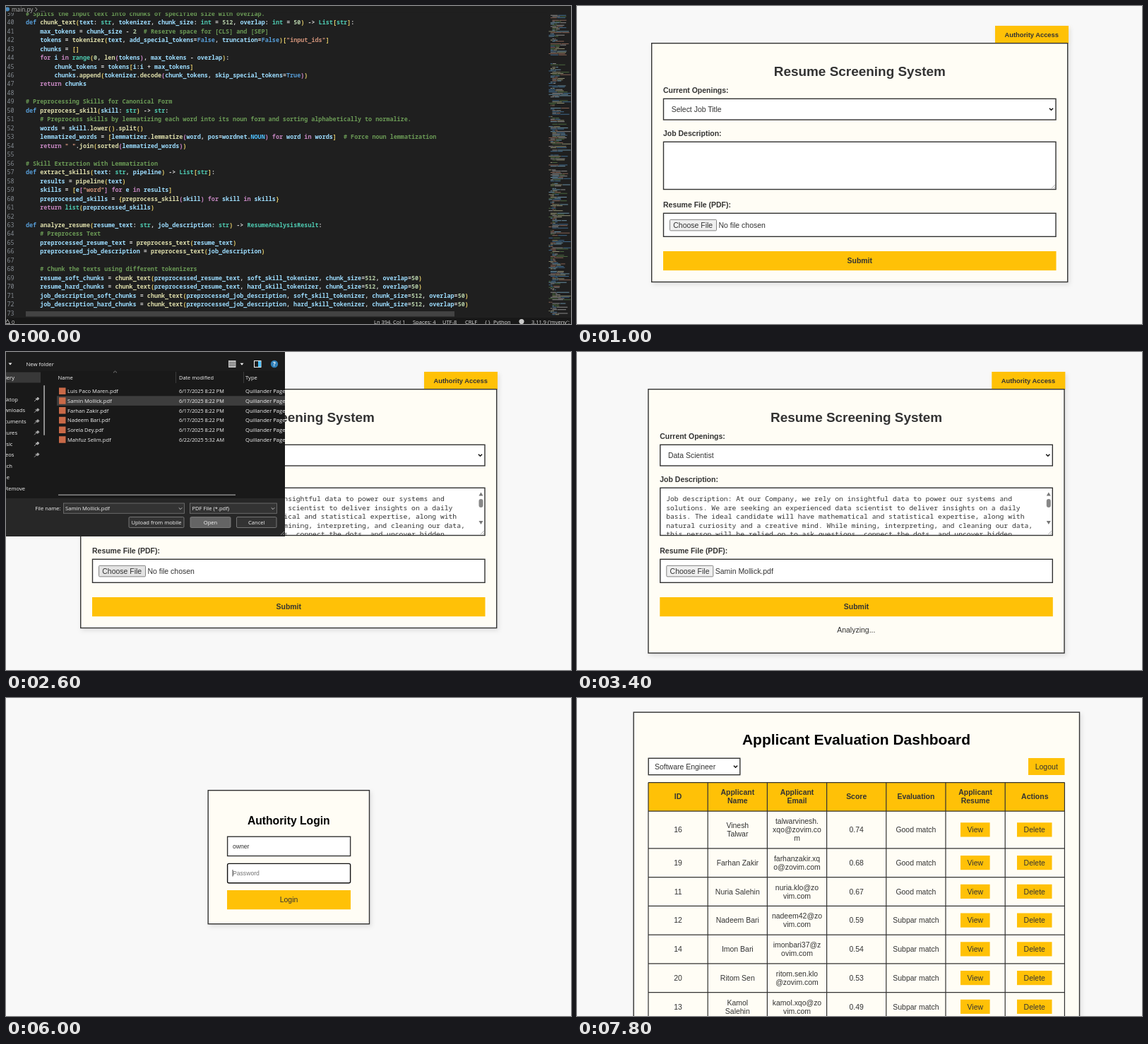
These frames come from a looping animation (800 px wide and 450 px high, 8000 ms). An HTML page:

```html
<!DOCTYPE html>
<html lang="en">
<head>
<meta charset="utf-8">
<title>Resume Screening System</title>
<style>
  html, body { margin: 0; width: 100%; height: 100%; overflow: hidden; background: #f8f8f8; }
  svg { display: block; width: 100vw; height: 100vh; }
  text { white-space: pre; }
  .sans { font-family: "Liberation Sans", Arial, sans-serif; }
  .ui { font-family: "Open Sans", "Noto Sans", sans-serif; }
  .mono { font-family: "Noto Sans Mono", "DejaVu Sans Mono", monospace; }
  .card { filter: drop-shadow(2px 3px 3px rgba(0, 0, 0, .1)); }
</style>
</head>
<body>
<svg id="stage" viewBox="0 0 800 450"></svg>
<script>
const stage = document.getElementById('stage');
const LOOP = 8000, STEP = 200;
const INK = '#333', GOLD = '#ffc107', CREAM = '#fffdf5';

const esc = s => String(s).replace(/&/g, '&amp;').replace(/</g, '&lt;').replace(/>/g, '&gt;');
const text = (x, y, s, size, fill = INK, extra = '') =>
  `<text x="${x}" y="${y}" font-size="${size}" fill="${fill}" ${extra}>${esc(s)}</text>`;
const MID = 'text-anchor="middle" ', END = 'text-anchor="end" ', BOLD = 'font-weight="700" ';
const box = (x, y, w, h, fill, stroke = 'none', sw = 1, extra = '') =>
  `<rect x="${x}" y="${y}" width="${w}" height="${h}" fill="${fill}" stroke="${stroke}" stroke-width="${sw}" ${extra}/>`;
const path = (d, stroke, sw = 1, fill = 'none') =>
  `<path d="${d}" fill="${fill}" stroke="${stroke}" stroke-width="${sw}"/>`;
const dot = (x, y, r, fill) => `<circle cx="${x}" cy="${y}" r="${r}" fill="${fill}"/>`;
const chevron = (x, y, r, color, sw = 1) => path(`M${x - r} ${y - r / 2}l${r} ${r} ${r} ${-r}`, color, sw);
const group = (cls, body, dx = 0, dy = 0) => `<g class="${cls}" transform="translate(${dx} ${dy})">${body}</g>`;
const button = (x, y, w, h, label, size = 10.5, extra = '') =>
  box(x, y, w, h, GOLD) + text(x + w / 2, y + h / 2 + size * .36, label, size, INK, MID + extra);

/* ---------- code editor ---------- */

const CODE = `# Splits the input text into chunks of specified size with overlap.
def chunk_text(text: str, tokenizer, chunk_size: int = 512, overlap: int = 50) -> List[str]:
    max_tokens = chunk_size - 2  # Reserve space for [CLS] and [SEP]
    tokens = tokenizer(text, add_special_tokens=False, truncation=False)["input_ids"]
    chunks = []
    for i in range(0, len(tokens), max_tokens - overlap):
        chunk_tokens = tokens[i:i + max_tokens]
        chunks.append(tokenizer.decode(chunk_tokens, skip_special_tokens=True))
    return chunks

# Preprocessing Skills for Canonical Form
def preprocess_skill(skill: str) -> str:
    # Preprocess skills by lemmatizing each word into its noun form and sorting alphabetically to normalize.
    words = skill.lower().split()
    lemmatized_words = [lemmatizer.lemmatize(word, pos=wordnet.NOUN) for word in words]  # Force noun lemmatization
    return " ".join(sorted(lemmatized_words))

# Skill Extraction with Lemmatization
def extract_skills(text: str, pipeline) -> List[str]:
    results = pipeline(text)
    skills = [e["word"] for e in results]
    preprocessed_skills = {preprocess_skill(skill) for skill in skills}
    return list(preprocessed_skills)

def analyze_resume(resume_text: str, job_description: str) -> ResumeAnalysisResult:
    # Preprocess Text
    preprocessed_resume_text = preprocess_text(resume_text)
    preprocessed_job_description = preprocess_text(job_description)

    # Chunk the texts using different tokenizers
    resume_soft_chunks = chunk_text(preprocessed_resume_text, soft_skill_tokenizer, chunk_size=512, overlap=50)
    resume_hard_chunks = chunk_text(preprocessed_resume_text, hard_skill_tokenizer, chunk_size=512, overlap=50)
    job_description_soft_chunks = chunk_text(preprocessed_job_description, soft_skill_tokenizer, chunk_size=512, overlap=50)
    job_description_hard_chunks = chunk_text(preprocessed_job_description, hard_skill_tokenizer, chunk_size=512, overlap=50)
`.split('\n');

const BRACKETS = ['#e8cf6a', '#d58ad0', '#5aa9e6'];

function paint(line) {
  let depth = 0;
  return line.replace(/#.*|"[^"]*"|\w+(?=\()|\w+|[()[\]{}]|[^\w\s]/g, (s, at) => {
    let c = '#d4d4d4';
    if (s[0] === '#') c = '#6a9955';
    else if (s[0] === '"') c = '#ce9178';
    else if (/^(for|in|return)$/.test(s)) c = '#c586c0';
    else if (/^(def|True|False)$/.test(s)) c = '#569cd6';
    else if (/^(str|int|list|List|range|ResumeAnalysisResult)$/.test(s)) c = '#4ec9b0';
    else if (/^\d/.test(s)) c = '#b5cea8';
    else if (/^\w/.test(s)) c = s === 'NOUN' ? '#4fc1ff' : line[at + s.length] === '(' ? '#dcdcaa' : '#9cdcfe';
    else if (/[([{]/.test(s)) c = BRACKETS[depth++ % 3];
    else if (/[)\]}]/.test(s)) c = BRACKETS[--depth % 3];
    return `<tspan fill="${c}">${esc(s)}</tspan>`;
  });
}

function minimap() {
  let seed = 7, out = '';
  const rnd = () => (seed = seed * 16807 % 2147483647) / 2147483647;
  const colors = ['#9cdcfe', '#d4d4d4', '#6a9955', '#dcdcaa', '#569cd6', '#ce9178'];
  const color = () => colors[Math.floor(rnd() * colors.length)];
  for (let y = 11; y < 437; y += 1.75) {
    if (rnd() < .14) continue;
    const x = 768.5 + (rnd() < .25 ? 0 : rnd() < .6 ? 2.5 : 5);
    const w = Math.min(4 + rnd() * 24, 799 - x), cut = w * (.25 + rnd() * .4);
    out += box(x, y, cut, .9, color()) + box(x + cut + .6, y, w - cut, .9, color());
  }
  return `<g opacity=".65">${out}</g>`;
}

function editor(scroll) {
  const rows = CODE.map((_, i) => {
    const y = 13.7 + i * 12.47;
    return text(11.5, y, 39 + i + scroll, 8.4, '#858b92', END) +
      `<text x="28" y="${y}" font-size="8.44" font-weight="600">${paint(CODE[(i + scroll) % CODE.length])}</text>`;
  }).join('');
  const status = [[521, 'Ln 394, Col 1'], [576, 'Spaces: 4'], [618, 'UTF-8'], [650, 'CRLF'], [678, '{ }'], [690, 'Python'], [744, "3.11.9 ('myenv': venv)"]];
  return box(0, 0, 800, 450, '#1f1f1f') + group('mono', rows) + minimap() +
    box(28, 432, 607, 7.5, '#434343') + box(0, 0, 766, 9.5, '#1f1f1f') +
    box(0, 441, 800, 9, '#181818') +
    group('ui', dot(2, 4.5, 3, '#4b8bbe') + text(8, 7.8, 'main.py', 8.2, '#b5b5b5') +
      path('M41.5 2l2.5 2.8-2.5 2.8', '#b5b5b5', .9) + text(49, 7.5, '...', 8, '#b5b5b5') +
      path('M-1 449.5l3.2-6 3.2 6z', '#ccc', .8) + text(8, 449.7, '0', 7.4, '#ccc') +
      status.map(([x, s]) => text(x, 449.7, s, 7.5, '#ddd')).join('') + dot(730, 446.5, 3.6, '#ccc'));
}

/* ---------- screening form ---------- */

const JOB = [
  'Job description: At our Company, we rely on insightful data to power our systems and',
  'solutions. We are seeking an experienced data scientist to deliver insights on a daily',
  'basis. The ideal candidate will have mathematical and statistical expertise, along with',
  'natural curiosity and a creative mind. While mining, interpreting, and cleaning our data,',
  'this person will be relied on to ask questions, connect the dots, and uncover hidden'];
const ROLES = ['Select Job Title', 'Data Scientist', 'Software Engineer'];
const PICKED = 'Samin Mollick.pdf';

const popup = (x, y, w, active) => box(x, y, w, 42, '#fff', '#767676', .8) +
  ROLES.map((r, i) => (i === active ? box(x + .5, y + 1 + i * 13.4, w - 1, 13.4, '#1967d2') : '') +
    text(x + 5, y + 11.3 + i * 13.4, r, 10.5, i === active ? '#fff' : INK)).join('');

const field = (y, h) => box(122.5, y, 555.5, h, '#fff', INK, 1.4);

function jobText() {
  return '<clipPath id="area"><rect x="123" y="193" width="545" height="66"/></clipPath>' +
    `<g class="mono" clip-path="url(#area)">${JOB.map((s, i) => text(130.9, 211 + i * 12.5, s, 9.73)).join('')}</g>` +
    path('M669.5 203.5h6l-3-5z', 'none', 0, '#777') + path('M669.5 239h6l-3 5z', 'none', 0, '#777') +
    box(669.5, 208, 6, 12, '#888', 'none', 0, 'rx="3"');
}

function form({ role, filled, browsing, file, analyzing, results, open, dx = 0, scroll = 0 }) {
  const bottom = results ? 503 : analyzing ? 426 : 390.5;
  let s = `<g class="card">${box(592, 28, 104, 25, GOLD)}${box(105.7, 52.7, 589, bottom - 52.7, CREAM, INK, 1.4)}</g>`;
  s += text(643.7, 43.6, 'Authority Access', 9.36, INK, MID + BOLD) +
    text(400.3, 98.6, 'Resume Screening System', 18.95, INK, MID + BOLD);
  [['Current Openings:', 122.8], ['Job Description:', 184], ['Resume File (PDF):', 285]]
    .forEach(([label, y]) => s += text(122, y, label, 10.47, INK, BOLD));
  s += field(131.3, 29.7) + text(133.7, 149.8, ROLES[role], 10.47) + chevron(671.5, 146, 2.6, '#111', 1.5) +
    field(192.3, 67.2) + (filled ? jobText() : '') + path('M672 258l5-5M675 258l2-2', '#999', .8) +
    field(293.3, 33) + box(131.5, 302.3, 66, 15.6, browsing ? '#e3e3e3' : '#efefef', '#767676', .9, 'rx="1.2"') +
    text(136.3, 313.7, 'Choose File', 10.47) + text(200.5, 313.7, file ? PICKED : 'No file chosen', 10.47) +
    button(122, 347, 556.5, 27.2, 'Submit', 10.47, BOLD);
  if (analyzing) s += text(400, 396.6, 'Analyzing...', 10.47, INK, MID);
  if (results) s += box(122.5, 388.2, 555.5, 98, '#f1f3f5', INK, 1.4) +
    text(136.5, 429.6, 'Analysis Results', 15.7, INK, BOLD) +
    text(137, 450.5, 'Score:', 10.47, '#444', BOLD) + text(172, 450.5, '0.61', 10.47, '#555') +
    text(137, 468, 'Evaluation:', 10.47, '#444', BOLD) + text(197, 468, 'Good match', 10.47, '#555');
  if (open) s += popup(122.5, 161.5, 555.5, 1);
  return box(0, 0, 800, 450, '#f8f8f8') + group('sans', s, dx, -scroll);
}

/* ---------- file dialog ---------- */

const FILES = ['Luis Paco Maren', 'Samin Mollick', 'Farhan Zakir', 'Nadeem Bari', 'Sorela Dey', 'Mahfuz Selim'];

function dialog(chosen) {
  const W = '#f4f4f4', say = (x, y, s, extra = '', size = 7.6) => text(x, y, s, size, W, extra);
  let s = box(0, 0, 395, 261, '#191919') + box(0, 0, 395, 27, '#1c1c1c') +
    path('M3.5 15.5h5l-2.5 3z', 'none', 0, W) + say(28.5, 19.7, 'New folder', '', 7.7) +
    box(315.5, 12.5, 9.5, 9, '#aaa', '#ddd', .8) + path('M316 15.5h9M316 18.5h9', '#555', .7) +
    path('M331.5 15.7h5l-2.5 3z', 'none', 0, W) +
    box(351.5, 12.5, 9.5, 9, 'none', W, 1) + box(357, 13, 4, 8, '#4cc2ff') +
    dot(380, 17, 5.2, '#2f7fb8') + text(380, 19.8, '?', 8, '#fff', MID + BOLD) +
    box(0, 28.5, 49, 15, '#383838') + say(12, 38.6, 'Gallery', END);
  [['Desktop', 17], ['Downloads', 27], ['Documents', 28.5], ['Pictures', 16], ['Music', 9.5], ['Videos', 11.5], ['tch', 9], ['e', 5], ['Remove', 27]]
    .forEach(([name, x], i) => {
      const y = 67 + i * 15.75;
      s += say(x, y + 2.7, name, END);
      if (i < 6) s += path(`M40 ${y + 3}l3-3M41.5 ${y - 1.5}l3 3M43 ${y - 1}l2-2 2 2-2 2z`, '#aaa', .9, '#aaa');
    });
  s += box(53.2, 47, 1.8, 71, '#999', 'none', 0, 'rx="1"') +
    say(73.5, 38.7, 'Name') + say(245, 38.7, 'Date modified', '', 7.4) + say(339, 38.7, 'Type') +
    path('M152 29.3l2.5-2.2 2.5 2.2', '#999', .8) + path('M240.5 28v16M336.5 28v16', '#444', .8);
  FILES.forEach((name, i) => {
    const y = 55.3 + i * 13.75;
    if (chosen && i === 1) s += box(72, y - 6.8, 323, 13.6, '#3d3d3d');
    s += box(75, y - 4.8, 9.5, 9.5, '#c96a48') + say(87, y + 2.7, name + '.pdf') +
      say(245, y + 2.7, i < 5 ? '6/17/2025 8:22 PM' : '6/22/2025 5:32 AM', '', 7.3) + say(339, y + 2.7, 'Quillander Page D');
  });
  s += box(74, 201.6, 251, 1.3, '#999') + box(0, 207, 395, 54, '#272727') +
    say(77.5, 223.5, 'File name:', END) + box(81.5, 214, 171, 14.3, '#333', '#777', .8) +
    say(84, 223.8, chosen ? PICKED : '') + chevron(247, 221.5, 2.3, '#ccc', .9) +
    box(260.5, 214, 123, 14.3, '#333', '#777', .8) + say(263.5, 223.8, 'PDF File (*.pdf)') + chevron(378, 221.5, 2.3, '#ccc', .9);
  [[174, 78, 'Upload from mobile', '#333'], [261, 57, 'Open', '#646464'], [326.5, 56.5, 'Cancel', '#333']]
    .forEach(([x, w, label, fill]) => s += box(x, 233.5, w, 15, fill, '#888', .8, 'rx="1.5"') + say(x + w / 2, 243.7, label, MID));
  s += path('M389 259l5-5M392 259l2-2', '#999', .9);
  return '<clipPath id="win"><rect width="395" height="261"/></clipPath>' + `<g class="ui" clip-path="url(#win)">${s}</g>`;
}

/* ---------- login ---------- */

function login(user, onPassword, typed) {
  const input = (y, on) => box(313.6, y, 174, 27.3, '#fff', on ? '#111' : INK, 1.4, on ? 'rx="2"' : '');
  const entry = typed ? text(321, 251.5, '•'.repeat(typed), 10, INK) : text(321, 250.9, 'Password', 8.65, '#757575');
  return box(0, 0, 800, 450, '#f8f8f8') + group('sans',
    `<g class="card">${box(286.2, 130.7, 228.3, 189, CREAM, INK, 1.4)}</g>` +
    text(400.3, 179, 'Authority Login', 15.7, '#000', MID + BOLD) +
    input(196.2, !onPassword) + text(321, 212.9, user || 'Username', 8.65, user ? INK : '#757575') +
    input(234.4, onPassword) + entry + (onPassword && !typed ? path('M321 243v9.5', '#222', .8) : '') +
    button(313, 272, 175, 27.2, 'Login'));
}

/* ---------- dashboard ---------- */

const HEAD = ['ID', 'Applicant|Name', 'Applicant|Email', 'Score', 'Evaluation', 'Applicant|Resume', 'Actions'];
const SOFTWARE = [
  [16, 'Vinesh|Talwar', 'talwarvinesh.|xqo@zovim.co|m', .74],
  [19, 'Farhan Zakir', 'farhanzakir.xq|o@zovim.com', .68],
  [11, 'Nuria Salehin', 'nuria.klo@zo|vim.com', .67],
  [12, 'Nadeem Bari', 'nadeem42@zo|vim.com', .59],
  [14, 'Imon Bari', 'imonbari37@z|ovim.com', .54],
  [20, 'Ritom Sen', 'ritom.sen.klo|@zovim.com', .53],
  [13, 'Kamol|Salehin', 'kamol.xqo@zo|vim.com', .49]];
const SCIENCE = [
  [17, 'Samin|Mollick', 'saminmol.xqo|@zovim.com', .61],
  [15, 'Farhan Zakir', 'farhanzakir.xq|o@zovim.com', .58],
  [18, 'Sorela Dey', 'sorela.dey@z|ovim.com', .55],
  [10, 'Mahfuz|Selim', 'mahfuz.klo@z|ovim.com', .52],
  [9, 'Nadeem Bari', 'nadeem42@zo|vim.com', .47]];

function dashboard(rows, role, dx, open) {
  const CW = 84.2, X = i => 101 + i * CW;
  const lines = (i, cy, s, extra = '') => {
    const parts = String(s).split('|');
    return parts.map((p, k) => text(X(i) + CW / 2, cy + 3.6 + (k - (parts.length - 1) / 2) * 12, p, 10.47, INK, MID + extra)).join('');
  };
  let y = 160.2, grid = 'M101 119.6H690.4M101 160.2H690.4';
  let s = box(101, 119.6, 589.4, 40.6, GOLD) + HEAD.map((h, i) => lines(i, 139.8, h, BOLD)).join('');
  for (const [id, name, mail, score] of rows) {
    const h = mail.split('|').length > 2 ? 52.6 : 40.75, cy = y + h / 2;
    [id, name, mail, score.toFixed(2), score > .6 ? 'Good match' : 'Subpar match'].forEach((v, i) => s += lines(i, cy, v));
    s += button(543, cy - 10.2, 41.6, 20.2, 'View') + button(623, cy - 10.2, 49.5, 20.2, 'Delete');
    y += h;
    grid += `M101 ${y}H690.4`;
  }
  for (let i = 0; i < 8; i++) grid += `M${X(i)} 119.6V${y}`;
  return box(0, 0, 800, 450, '#f8f8f8') + group('sans',
    `<g class="card">${box(80.2, 20.2, 631.3, y + 20.5 - 20.2, CREAM, INK, 1.4)}</g>` +
    text(395.5, 66.2, 'Applicant Evaluation Dashboard', 21, '#000', MID + BOLD) +
    box(101.2, 85.3, 129.6, 23.4, '#fff', INK, 1.4) + text(110, 100.7, ROLES[role], 10.47) + chevron(224.5, 97, 2.6, '#111', 1.5) +
    button(639, 85, 51.5, 24, 'Logout') + s + path(grid, INK, 1.2) +
    (open ? popup(101.2, 109.5, 129.6, 2) : ''), dx);
}

/* ---------- timeline ---------- */

// Progress from 0 to 1 between two times.
const ramp = (t, from, to) => Math.min(1, Math.max(0, (t - from) / (to - from)));

function scene(t) {
  if (t < 1000) return editor(Math.round(ramp(t, 0, 800) * 72));
  if (t < 1600) return form({ role: 0, open: t >= 1200 });
  if (t < 2800) {
    return form({ role: 1, filled: true, browsing: t >= 2000 }) + (t >= 2200 ? dialog(t >= 2400) : '');
  }
  if (t < 5000) {
    const busy = t >= 3200 && t < 3800, done = t >= 3800;
    const scroll = 80 * (ramp(t, 3800, 4200) - ramp(t, 4200, 4600));
    return form({ role: 1, filled: true, file: true, analyzing: busy, results: done, dx: busy || done ? -4.7 : 0, scroll });
  }
  if (t < 7000) {
    const user = 'owner'.slice(0, Math.ceil(ramp(t, 5200, 5800) * 5));
    return login(user, t >= 6000, Math.round(ramp(t, 6000, 6800) * 8));
  }
  if (t < 7800) return dashboard(SCIENCE, 1, 4.7, t >= 7600);
  return dashboard(SOFTWARE, 2, 0, false);
}

let shown = -1;
const start = performance.now();
function tick(now) {
  const t = Math.floor(Math.max(0, now - start) % LOOP / STEP) * STEP;
  if (t !== shown) stage.innerHTML = scene(shown = t);
  requestAnimationFrame(tick);
}
tick(start);
</script>
</body>
</html>
```
